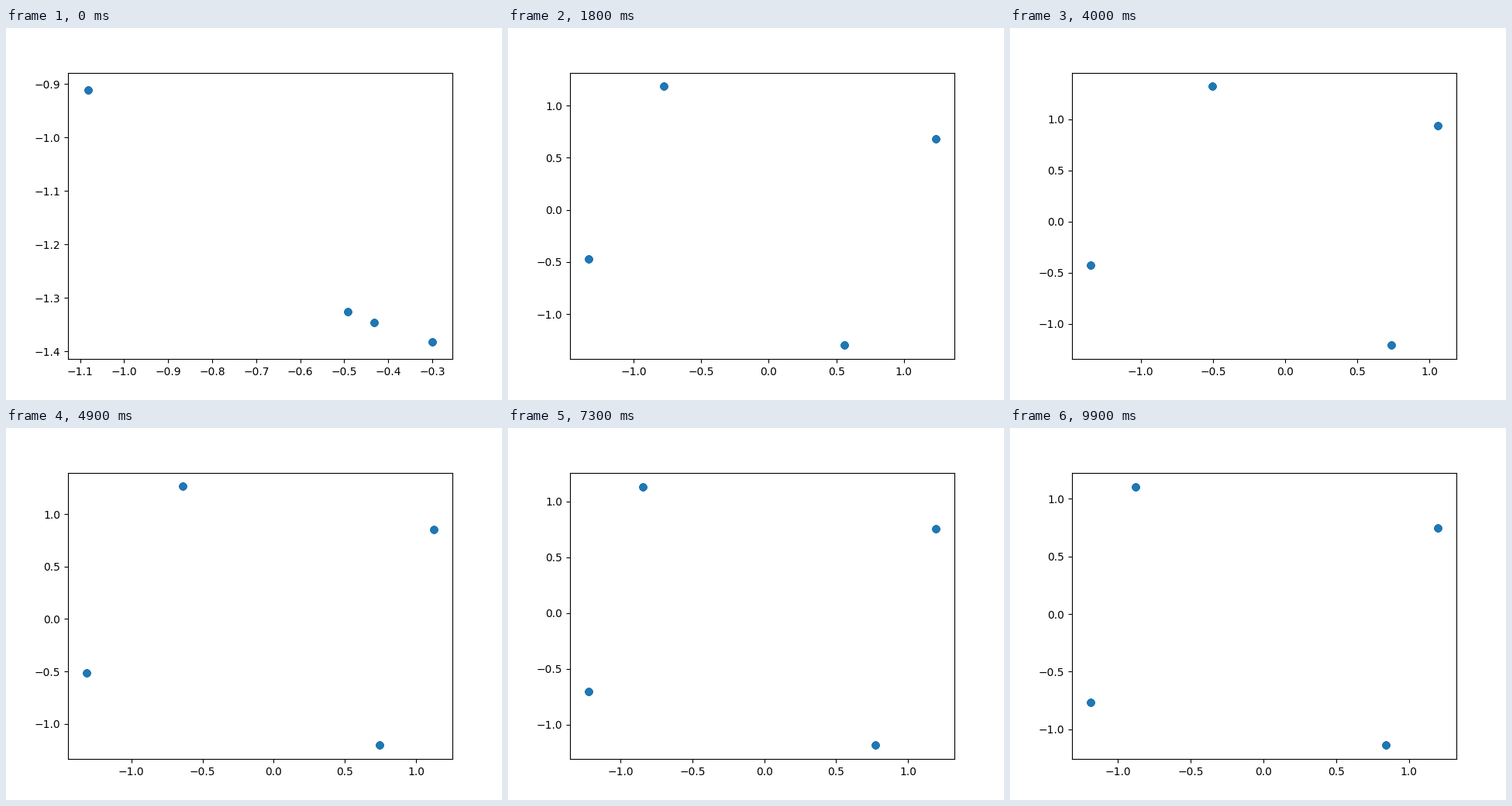
Recreate the animation shown at these times as a matplotlib script. Size 640x480 px, loop 10 s.

```python
import numpy as np
import matplotlib.pyplot as plt
from matplotlib.animation import FuncAnimation

FRAMES = 100
TURN = 30        # frame at which the points have swung furthest apart
RADIUS = np.sqrt(2)
LAYERS = 40      # coincident markers give the dots their hard edge
MARKER_PX = 3    # marker extent that widens the data limits
MARGIN = 0.05

# Angles of the four points in degrees, and how sharply each one brakes
START = np.array([220.1, 249.65, 252.2, 257.75])
PEAK = np.array([105.25, 193.8, 301.1, 406.5])
REST = np.array([128.5, 212.7, 306.4, 392.0])
SWING = np.array([2.56, 3.2, 2.55, 2.95])
SETTLE = np.array([3.3, 2.5, 0.6, 5.0])


def ease(t, power):
    """Soft start, then braking that grows with power."""
    t = np.clip(t, 0, 1)
    return 1 - (1 - t ** 1.3) ** power


def points(frame):
    out = ease(frame / TURN, SWING)
    back = ease((frame - TURN) / (FRAMES - 1 - TURN), SETTLE)
    a = np.radians(START + (PEAK - START) * out + (REST - PEAK) * back)
    return RADIUS * np.column_stack([np.cos(a), np.sin(a)])


def limits(values, size):
    """Padded limits, widened to a half-unit tick that lies just outside."""
    lo = values.min() - MARKER_PX / size
    hi = values.max() + MARKER_PX / size
    pad = MARGIN * (hi - lo)
    lo, hi = lo - pad, hi + pad
    tol = 0.6 * (hi - lo) / size
    low_tick, high_tick = np.floor(lo * 2) / 2, np.ceil(hi * 2) / 2
    return (low_tick if lo - low_tick < tol else lo,
            high_tick if high_tick - hi < tol else hi)


fig, ax = plt.subplots(figsize=(6.4, 4.8), dpi=100)
width, height = ax.bbox.width, ax.bbox.height
dots = ax.scatter(np.zeros(4 * LAYERS), np.zeros(4 * LAYERS), color="#1f77b4")


def update(frame):
    p = points(frame)
    dots.set_offsets(np.tile(p, (LAYERS, 1)))
    ax.set_xlim(*limits(p[:, 0], width))
    ax.set_ylim(*limits(p[:, 1], height))
    return dots,


anim = FuncAnimation(fig, update, frames=FRAMES, interval=100,
                     init_func=lambda: update(0), repeat=True, repeat_delay=0)
plt.show()
```
